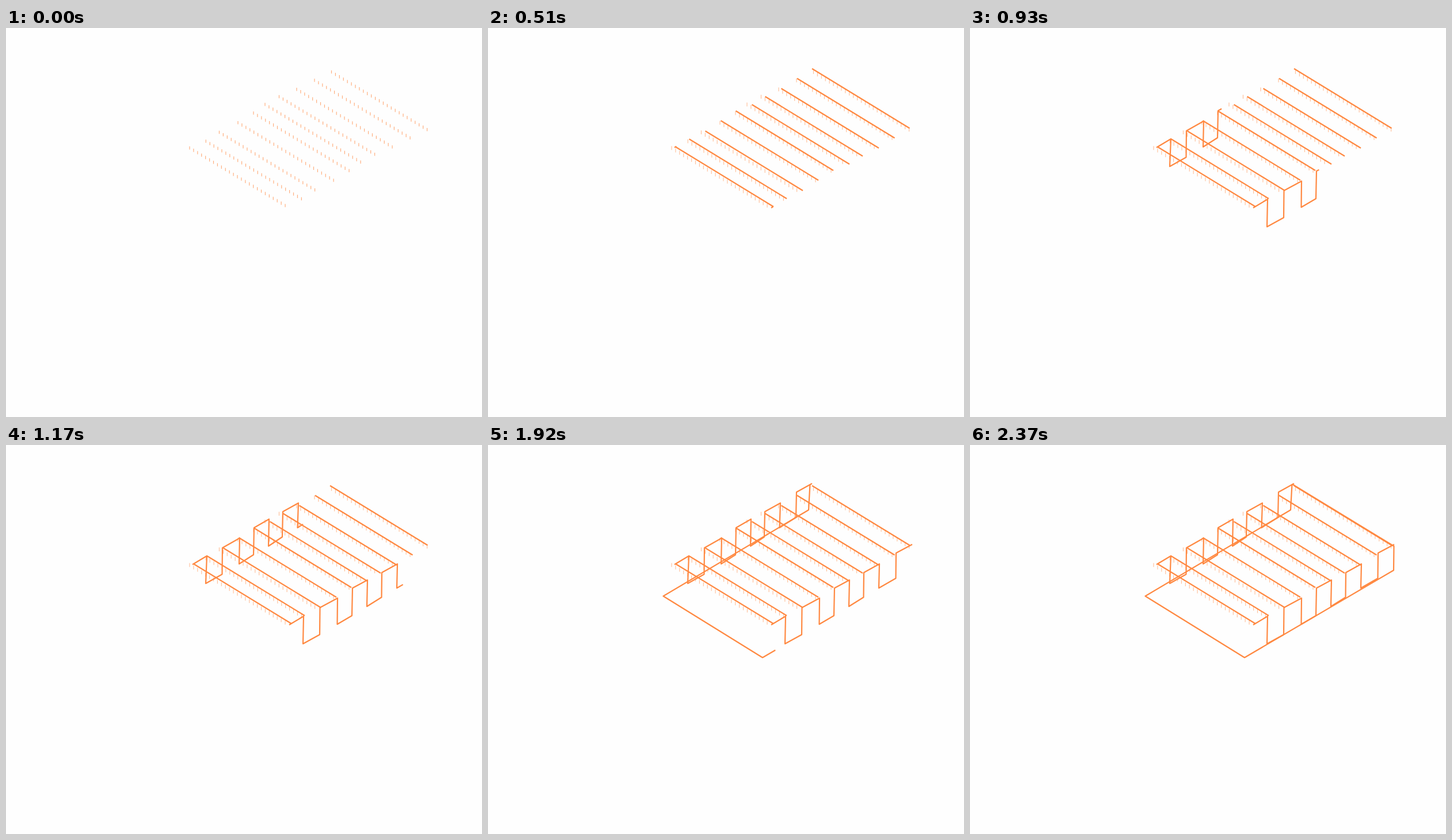
Animation, 827 px wide and 677 px high, one loop 2.7 s. Source, as an HTML page:

```html
<!DOCTYPE html>
<html>
<head>
<meta charset="utf-8">
<style>
  html, body { margin: 0; width: 100%; height: 100%; overflow: hidden; background: #fefefe; }
  svg { display: block; }
  path { fill: none; stroke: #ff8840; stroke-width: 2.2; stroke-linejoin: round; }
  #ticks { stroke-width: 1.2; }
</style>
</head>
<body>
<svg width="827" height="677" viewBox="0 0 827 677"><path id="ticks"/></svg>
<script>
const LOOP = 2700, STEP = 30;
const svg = document.querySelector('svg');
const ticks = document.getElementById('ticks');

const tickRows = [[565.5, 76.5], [536, 91], [505, 106.7], [474.5, 119.5], [450, 133],
  [430, 148], [403, 164.7], [370.5, 181.5], [347.3, 197], [319, 208.7]];
const beamEnds = [[732.5, 174.5], [706.5, 191.5], [679, 209], [651, 223], [628, 237],
  [600, 248], [574, 265], [547, 283], [519, 297], [496, 311]];
const leftFold = 'M324 208L349 193L347 241L375.5 225L376 179L406 162L405 207L430 191L431 144L457 129' +
  'L456 176L480 160L481 116L508 101L506.5 144L535 126L536 82L563 67';
const rightFold = 'M492 313L517 298L516 346L545 330L545.5 283L576 266.5L575.5 312L601 297L602 249L628 235' +
  'L627 281L652.5 265L653 222L680 207L679 249L708.5 232L709 188L737 173';
const frame = 'M559.5 68L557 113L304.5 263L477 370L736 218L736.5 176L559.5 68';

const smooth = (t, start, duration) => {
  const x = Math.min(1, Math.max(0, (t - start) / duration));
  return x * x * (3 - 2 * x);
};

function addPath(d) {
  const path = document.createElementNS('http://www.w3.org/2000/svg', 'path');
  path.setAttribute('d', d);
  path.setAttribute('pathLength', 1);
  return svg.appendChild(path);
}

function reveal(paths, amount) {
  for (const path of paths) {
    path.style.visibility = amount > 0 ? 'visible' : 'hidden';
    path.style.strokeDasharray = amount < 1 ? `${amount} 2` : 'none';
  }
}

const beams = beamEnds.map(([x, y]) => addPath(`M${x} ${y}l-169.5 -103.8`));
const folds = [leftFold, rightFold].map(addPath);
const outline = [addPath(frame)];

function drawTicks(grow) {
  const top = 2.8 + 0.4 * grow, height = 5.6 + 1.1 * grow;
  let d = '';
  for (const [x, y] of tickRows)
    for (let i = 0; i < 25; i++)
      d += `M${x + i * 6.92} ${y + i * 4.18 - top}v${height}`;
  ticks.setAttribute('d', d);
  ticks.style.strokeOpacity = 0.66 - 0.16 * grow;
}

function render(now) {
  const t = Math.floor(now % LOOP / STEP) * STEP;
  drawTicks(smooth(t, 0, 200));
  reveal(beams, smooth(t, 0, 471));
  reveal(folds, smooth(t, 468, 930));
  reveal(outline, 1.014 * smooth(t, 1386, 1050));
  requestAnimationFrame(render);
}
render(performance.now());
</script>
</body>
</html>
```
